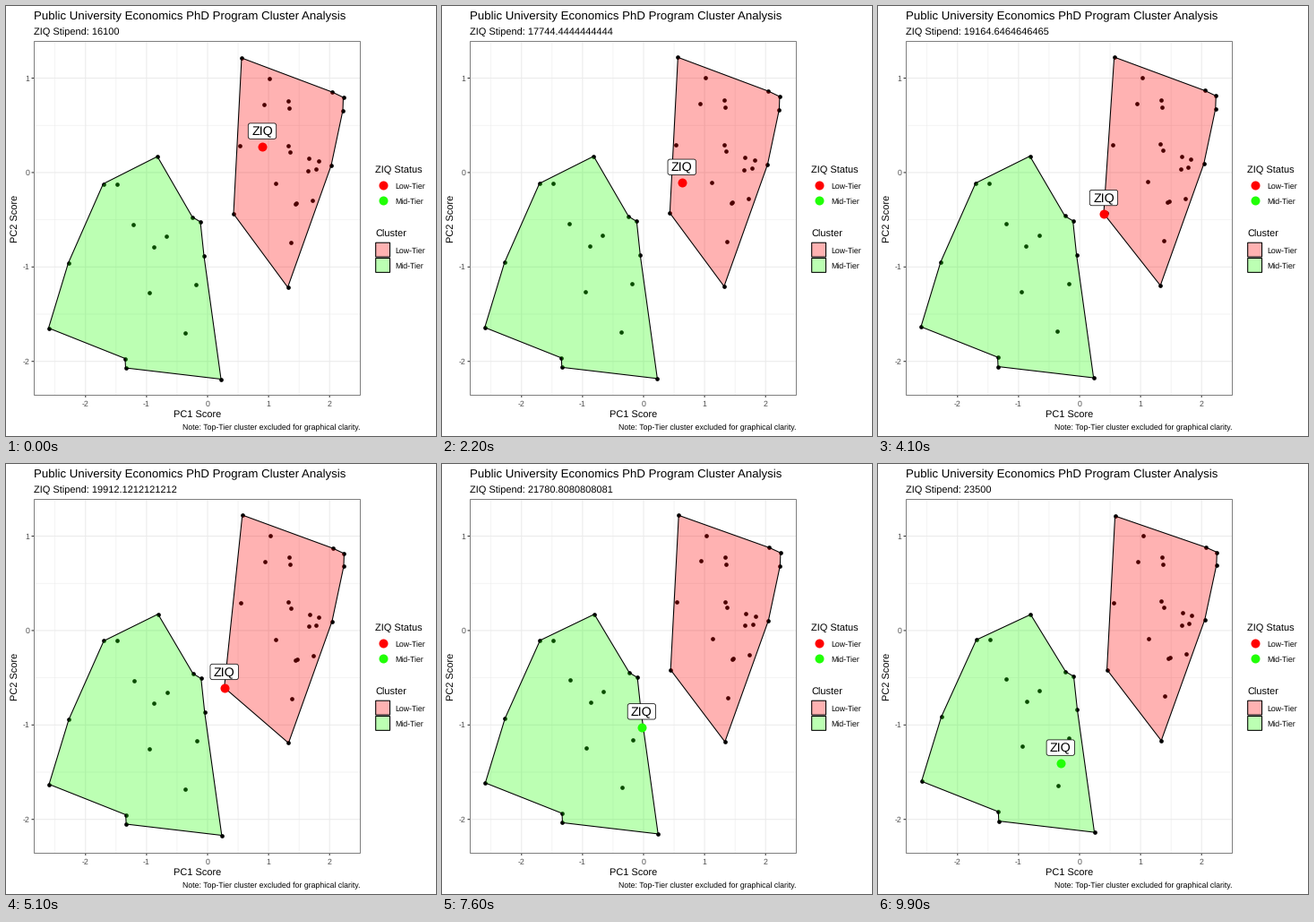
A matplotlib script that plays this animation: 480x480 px, repeating every 10000 ms.

```python
import matplotlib.pyplot as plt
import numpy as np
from matplotlib.animation import FuncAnimation
from matplotlib.patches import FancyBboxPatch, Polygon, Rectangle

SIZE, DPI, FRAMES = 480, 72, 100
NAME = "ZIQ"
RED, GREEN = (1, 0, 0), (33 / 255, 1, 6 / 255)
LEFT, RIGHT, TOP, BOTTOM = 31.3, 395.3, 39.3, 434.2
SWITCH = 52  # step at which the school joins the other cluster

plt.rcParams["font.family"] = "Liberation Sans"
plt.rcParams["text.hinting"] = "none"

# corners of each cluster, clockwise, and the points within
LOW_EDGE = [(263, 58), (364, 96), (376.5, 102), (376, 116.5), (363, 178),
            (314.5, 314), (254, 232)]
LOW_IN = [(294, 81), (288, 110), (315, 106), (316, 114), (261, 156),
          (314.5, 156), (317, 163), (338, 170), (348.5, 173), (345.5, 182),
          (337, 183.5), (300.5, 198), (322.5, 221), (324, 220), (342, 216.5),
          (318, 264)]
MID_EDGE = [(169, 168), (208, 235.5), (217, 241), (221, 279), (240, 416.5),
            (133.5, 404), (133, 393.5), (47.5, 359.5), (69.5, 287),
            (108.5, 198.5)]
MID_IN = [(123.5, 198.5), (142, 244), (164.5, 269), (179, 257), (212, 311),
          (159.5, 320), (199.5, 364.5)]


def drift(pts, t, rise, arch):
    """Slide right and up by `rise` over the loop, on a shallow arc."""
    x, y = np.transpose(pts)
    bow = 4 * (arch + .22 * rise) * t * (1 - t)
    return np.column_stack([x + (1 + x / 450) * t, y - rise * t + bow])


def low_at(t):
    x, y = np.transpose(LOW_EDGE + LOW_IN)
    return drift(LOW_EDGE + LOW_IN, t,
                 .0155 * (y - 58) + .025 * (x - 264), -1)


def mid_at(t):
    y = np.transpose(MID_EDGE + MID_IN)[1]
    return drift(MID_EDGE + MID_IN, t,
                 5.5 * (1 - np.exp((168 - y) / 60)), -.4)


def school_at(t):
    return np.array([286 - 82.2 * t, 157.2 + 177 * t + 4.8 * t * (1 - t)])


def edge_x(corners, y):
    """Where a cluster's side, listed downwards, crosses height y."""
    x, ys = np.transpose(corners)
    return np.interp(y, ys, x)


def low_outline(p, school):
    if school[0] < edge_x([p[0], p[6], p[5]], school[1]):
        return [*p[:6], school]
    return p[:7]


def mid_outline(p, school):
    if school[0] > edge_x(p[2:5], school[1]):
        side = sorted([p[2], p[3], school], key=lambda q: q[1])
        return [p[0], *side, *p[4:10]]
    return p[:10]


fig = plt.figure(figsize=(SIZE / DPI, SIZE / DPI), dpi=DPI, facecolor="white")
ax = fig.add_axes([0, 0, 1, 1])
ax.set_xlim(0, SIZE)
ax.set_ylim(SIZE, 0)
ax.axis("off")


def write(x, y, s, size, color="black", ha="left", **kw):
    return ax.text(x, y, s, fontsize=size, color=color, ha=ha,
                   va="baseline", **kw)


def dots(xy, r, color, z):
    return ax.scatter(*np.transpose(xy), s=(2 * r) ** 2, color=color,
                      linewidths=0, zorder=z)


def line(xs, ys, color, lw, z):
    ax.plot(xs, ys, color=color, lw=lw, zorder=z, solid_capstyle="butt",
            snap=False)


def px(v):
    return 225 + 68.1 * v


def py(v):
    return 185.9 - 105.4 * v


# panel
for v in np.arange(-2.5, 2.1, .5):
    major = v == int(v)
    lw, z = (1.07, 1) if major else (.53, .5)
    line([px(v)] * 2, [TOP, BOTTOM], "#ebebeb", lw, z)
    if -2 <= v <= 1:
        line([LEFT, RIGHT], [py(v)] * 2, "#ebebeb", lw, z)
    if major:
        line([px(v)] * 2, [BOTTOM, BOTTOM + 2.75], "#333333", 1.07, 1)
        write(px(v), 446.8, f"{v:.0f}", 8.8, "#4d4d4d", "center")
        if v <= 1:
            line([LEFT - 2.75, LEFT], [py(v)] * 2, "#333333", 1.07, 1)
            write(26.4, py(v) + 3.1, f"{v:.0f}", 8.8, "#4d4d4d", "right")
ax.add_patch(Rectangle((LEFT, TOP), RIGHT - LEFT, BOTTOM - TOP, fill=False,
                       ec="#7f7f7f", lw=1, zorder=6))

# titles
write(31, 15, "Public University Economics PhD Program Cluster Analysis", 13.2)
subtitle = write(31, 32.3, "", 11)
write(213.2, 459, "PC1 Score", 11, ha="center")
write(13.3, 237, "PC2 Score", 11, ha="center", rotation=90,
      rotation_mode="anchor")
write(395.6, 473, "Note: Top-Tier cluster excluded for graphical clarity.",
      8.8, ha="right")

# legends
write(412, 185.6, f"{NAME} Status", 11)
write(412, 257.6, "Cluster", 11)
for k, (tier, color) in enumerate([("Low-Tier", RED), ("Mid-Tier", GREEN)]):
    y = 17.28 * k
    dots([(420.6, 200 + y)], 5, color, 3)
    write(434.6, 203.6 + y, tier, 8.8)
    ax.add_patch(Rectangle((412.7, 264.2 + y), 15.86, 15.86, fc=(*color, .3),
                           ec="black", lw=1.07, snap=False))
    write(434.6, 275.8 + y, tier, 8.8)

# moving parts
low_dots = dots(low_at(0), 2.35, "black", 2)
mid_dots = dots(mid_at(0), 2.35, "black", 2)
low_hull, mid_hull = (
    ax.add_patch(Polygon([(0, 0), (1, 1)], closed=True, fc=(*c, .3),
                         ec="black", lw=1.07, joinstyle="round", zorder=3))
    for c in (RED, GREEN))
school_dot = dots([school_at(0)], 5, RED, 4)
box = ax.add_patch(FancyBboxPatch((0, 0), 26.6, 12.6, fc="white", ec="black",
                                  boxstyle="round,pad=2.4,rounding_size=2.4",
                                  lw=.75, zorder=5))
label = write(0, 0, NAME, 14.2, ha="center", zorder=5.5)


def update(i):
    t = i / (FRAMES - 1)
    joined = i >= SWITCH
    low, mid, school = low_at(t), mid_at(t), school_at(t)
    low_dots.set_offsets(low)
    mid_dots.set_offsets(mid)
    low_hull.set_xy(low[:7] if joined else low_outline(low, school))
    mid_hull.set_xy(mid_outline(mid, school) if joined else mid[:10])
    school_dot.set_offsets([school])
    school_dot.set_color(GREEN if joined else RED)
    x, y = school - (0, 17.6)
    box.set_x(x - 13.3)
    box.set_y(y - 6.3)
    label.set_position((x, y + 5))
    subtitle.set_text(f"{NAME} Stipend: {16100 + 7400 * t:.15g}")
    return (low_dots, mid_dots, low_hull, mid_hull, school_dot, box, label,
            subtitle)


anim = FuncAnimation(fig, update, frames=FRAMES, interval=100, repeat=True,
                     repeat_delay=0, blit=False)
plt.show()
```
